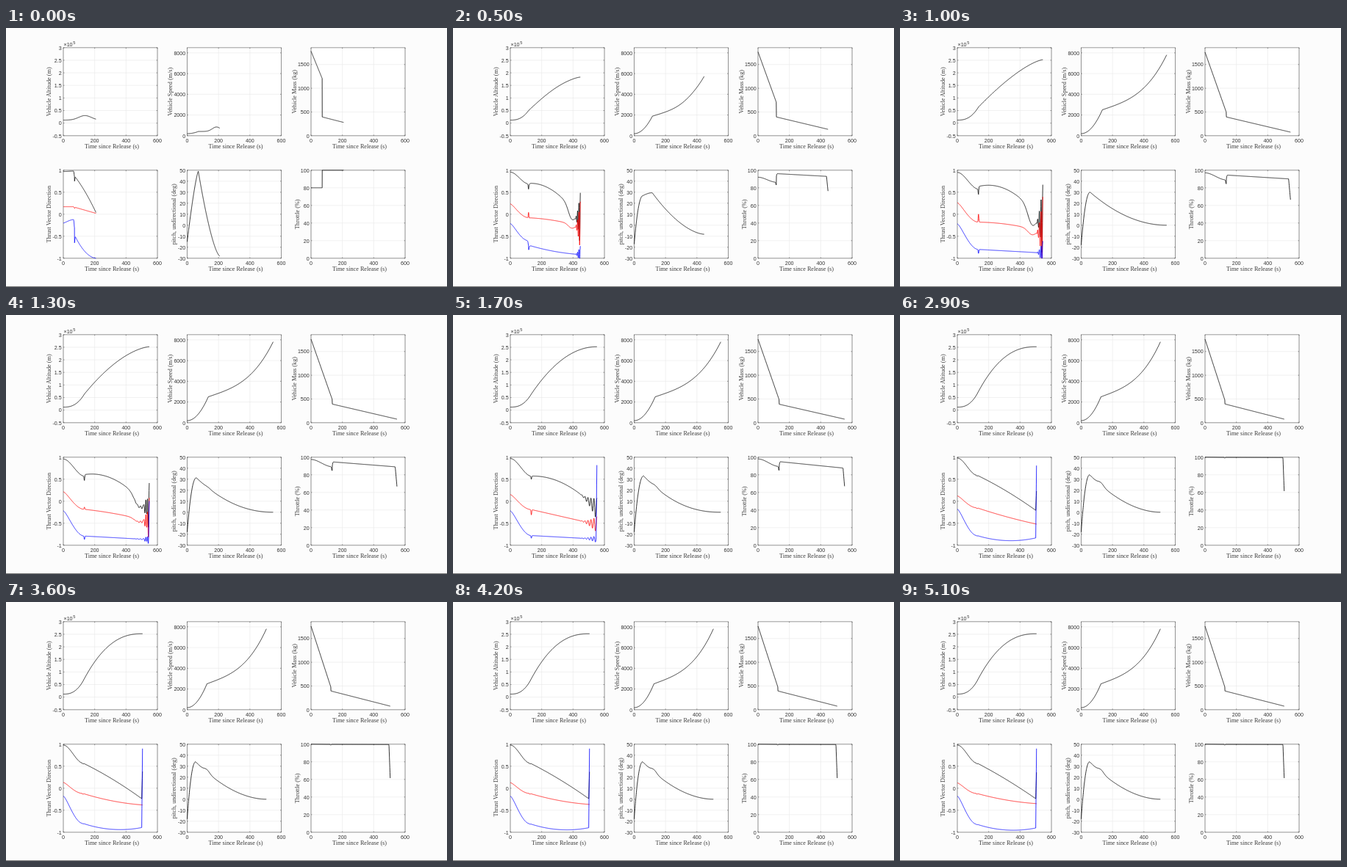
Animation of 600 by 353 pixels, one loop 5400 ms. Source, as an HTML page:

```html
<!DOCTYPE html>
<html lang="en">
<head>
<meta charset="utf-8">
<title>Ascent optimisation</title>
<style>
  html, body { margin: 0; width: 100%; height: 100%; overflow: hidden; background: #fcfcfc; }
  svg { display: block; width: 600px; height: 353px; }
  .tick { font: 7.1px "Liberation Sans", Arial, sans-serif; fill: #333; }
  .label { font: 8.2px "Liberation Serif", "Times New Roman", serif; fill: #3c3c3c; text-anchor: middle; }
  .grid { stroke: #e8e8e8; stroke-width: .6; fill: none; }
  .axes { stroke: #555; stroke-width: .6; fill: none; }
  .curve { stroke-width: .8; fill: none; stroke-linejoin: round; }
</style>
</head>
<body>
<svg id="stage" viewBox="0 0 600 353"></svg>
<script>
const STEP = 100, LOOP = 5400, LAST = 51;
const W = 128, H = 120, T_MAX = 600;
const N = 400, SPLIT = N / 4;          // samples per curve, and those before staging
const stage = document.getElementById('stage');
const lerp = (a, b, p) => a + (b - a) * p;
const clamp = (v, lo = 0, hi = 1) => Math.min(hi, Math.max(lo, v));
const smooth = x => x * x * (3 - 2 * x);
const arch = w => 4 * w * (1 - w);
const hill = (t, mid, width) => Math.exp(-(((t - mid) / width) ** 2));

function el(tag, attrs, parent = stage, text) {
  const e = document.createElementNS('http://www.w3.org/2000/svg', tag);
  for (const k in attrs) e.setAttribute(k, attrs[k]);
  if (text !== undefined) e.textContent = text;
  parent.appendChild(e);
  return e;
}

// Flight model: S is the staging time, T the end of flight
const second = (k, t) => clamp((t - k.S) / (k.T - k.S));

const altitude = k => t => t <= k.S
  ? .12 + .52 * (t / k.S) ** 2.6
  : .64 + 1.88 * (1 - (1 - second(k, t)) ** k.bend);

const speed = k => t => {
  const w = second(k, t);
  return t <= k.S ? 200 + 2300 * (t / k.S) ** 2 : 2500 + 5300 * (.4 * w + .6 * w ** 3.3);
};

const mass = k => t => {
  const [full, burnt, upper, end] = k.mass;
  return t <= k.S ? lerp(full, burnt, t / k.S) : lerp(upper, end, second(k, t));
};

// Eased turn, kick at staging, arched second stage, wobble and jump at cut-off
const thrust = (k, i) => t => {
  const [from, staged, end, bulge = 0, jump = 0, restart = staged] = k.dir[i];
  const w = second(k, t);
  let v = t <= k.S
    ? lerp(from, staged, smooth((t / k.S) ** (i ? .75 : 1)))
    : lerp(restart, end, w) + bulge * arch(w) + jump * clamp((t - k.T) / 5 + 1);
  if (k.kick) v += k.kick[i] * hill(t, k.S, 3);
  if (k.sink) v += k.sink[i] * hill(w, .83, .09);
  if (k.wobble) {
    const { start, period, amp } = k.wobble;
    v += amp[i] * clamp((t - start) / (k.T - start)) ** 2 * Math.cos(2 * Math.PI * (k.T - t) / period);
  }
  return clamp(v, -1, 1);
};

const pitch = k => t => {
  const { from, peak, at, rise, end, fall, knee } = k.pitch;
  return t <= at
    ? lerp(peak, from, (1 - t / at) ** rise)
    : lerp(end, peak, (1 - (t - at) / (k.T - at)) ** fall) + knee * hill(t, k.S, 25);
};

const throttle = k => t => {
  const { from, staged, upper, end, dip, fade, final } = k.throttle;
  const level = t <= k.S ? lerp(from, staged, smooth(t / k.S)) : lerp(upper, end, second(k, t));
  return lerp(level - dip * hill(t, k.S, 4), final, clamp((t - k.T) / fade + 1));
};

// Key iterations; each is sampled so that both flight phases line up
const keys = [];
function key(step, k) {
  const time = Array.from({ length: N + 1 }, (_, i) =>
    i <= SPLIT ? k.S * i / SPLIT : lerp(k.S, k.T, (i - SPLIT) / (N - SPLIT)));
  const rules = [k.alt || altitude(k), k.speed || speed(k), mass(k),
    thrust(k, 0), thrust(k, 1), thrust(k, 2), pitch(k), throttle(k)];
  keys.push({ step, ease: k.ease || 1, time, values: rules.map(f => time.map(f)) });
}

key(0, {
  S: 71, T: 208, ease: .5,
  alt: t => .12 + .18 * hill(t, 138, 57),
  speed: t => 200 + 210 * clamp(t / 72) ** 2 + 430 * hill(t, 187, 38),
  mass: [1780, 1206, 395, 280],
  dir: [[.97, .98, .04, .05, 0, .87], [.17, .17, .02, 0, 0, .16], [-.2, -.12, -1, -.12, 0, -.47]],
  kick: [-.12, -.03, -.18],
  pitch: { from: -15, peak: 49, at: 71, rise: 1.3, end: -28, fall: 1.5, knee: 0 },
  throttle: { from: 80, staged: 80, upper: 100, end: 100, dip: 0, fade: 1, final: 100 }
});

key(10, {
  S: 135, T: 545, bend: 1.4, mass: [1760, 500, 395, 75],
  dir: [[.95, .57, -.2, .3, 0, .63], [.26, -.18, -.4, .05], [-.22, -.8, -.88]],
  kick: [-.12, .18, -.09],
  sink: [-.35, -.13, 0],
  wobble: { start: 500, period: 11, amp: [.88, .8, .27] },
  pitch: { from: -18, peak: 30, at: 57, rise: 2.1, end: 0, fall: 2, knee: 0 },
  throttle: { from: 97, staged: 89, upper: 94.5, end: 90, dip: 4.5, fade: 12, final: 66.5 }
});

key(17, {
  S: 134, T: 552, bend: 2.05, mass: [1760, 490, 390, 75],
  dir: [[.97, .57, -.18, .2], [.15, -.19, -.53], [-.22, -.78, -.86, 0, 1.6]],
  kick: [-.07, -.12, -.06],
  wobble: { start: 430, period: 19, amp: [.25, .18, .08] },
  pitch: { from: -18, peak: 33, at: 60, rise: 2.1, end: 0, fall: 2.25, knee: 1.5 },
  throttle: { from: 98, staged: 89.5, upper: 95, end: 87.5, dip: 4.5, fade: 10, final: 67 }
});

key(21, {
  S: 128, T: 523, bend: 2.3, mass: [1760, 480, 395, 75], ease: .7,
  dir: [[.97, .63, -.18, .06], [.19, -.2, -.5, -.08], [-.2, -.76, -.84, -.06, 1.64]],
  kick: [-.07, -.06, -.05],
  wobble: { start: 410, period: 19, amp: [.08, .04, .02] },
  pitch: { from: -18, peak: 33, at: 58, rise: 2.1, end: 0, fall: 2, knee: 2.5 },
  throttle: { from: 98, staged: 93.5, upper: 97, end: 95.8, dip: 4.5, fade: 10, final: 68 }
});

const settled = {
  S: 126, T: 505, bend: 2.4, mass: [1760, 480, 395, 75], kick: [-.02, -.02, -.01],
  pitch: { from: -18, peak: 34, at: 54, rise: 2.1, end: 0, fall: 1.9, knee: 2.5 },
  throttle: { from: 100, staged: 99.8, upper: 99.8, end: 99.6, dip: .8, fade: 8, final: 61.5 }
};
key(29, { ...settled, dir: [[.98, .59, -.22, .04, .45], [.12, -.15, -.52, -.02], [-.18, -.78, -.83, -.09, 1.64]] });
key(36, { ...settled, dir: [[.98, .57, -.25, .04, .63], [.13, -.12, -.38, -.04], [-.18, -.8, -.89, -.09, 1.79]] });
key(LAST, { ...settled, dir: [[.98, .57, -.25, .03, .61], [.12, -.12, -.35, -.035], [-.18, -.82, -.9, -.09, 1.8]] });

// Plots
const curves = [];
function plot(x, y, lo, hi, last, gap, name, nameX, colors = ['#000']) {
  const px = t => x + t / T_MAX * W, py = v => y + H - (v - lo) / (hi - lo) * H;
  el('rect', { x, y, width: W, height: H, fill: '#fff' });
  let grid = '', marks = `M${x} ${y}h${W}v${H}h${-W}z`;
  for (let t = 0; t <= T_MAX; t += 200) {
    grid += `M${px(t)} ${y}v${H}`;
    marks += `M${px(t)} ${y}v1.4M${px(t)} ${y + H}v-1.4`;
    el('text', { class: 'tick', x: px(t), y: y + H + 8.8, 'text-anchor': 'middle' }, stage, t);
  }
  for (let v = lo; v <= last; v += gap) {
    grid += `M${x} ${py(v)}h${W}`;
    marks += `M${x} ${py(v)}h1.4M${x + W} ${py(v)}h-1.4`;
    el('text', { class: 'tick', x: x - 2.3, y: py(v) + 2.7, 'text-anchor': 'end' }, stage, v);
  }
  el('path', { class: 'grid', d: grid });
  el('path', { class: 'axes', d: marks });
  el('text', { class: 'label', x: x + W / 2 + 2, y: y + H + 17.5 }, stage, 'Time since Release (s)');
  el('text', { class: 'label', transform: `translate(${nameX} ${y + H / 2}) rotate(-90)` }, stage, name);
  for (const stroke of colors) curves.push({ path: el('path', { class: 'curve', stroke }), px, py });
}

const COLS = [78, 246.5, 415], TOP = 26.8, LOW = 193.8;
plot(COLS[0], TOP, -.5, 3, 3, .5, 'Vehicle Altitude (m)', 61);
plot(COLS[1], TOP, 0, 8500, 8000, 2000, 'Vehicle Speed (m/s)', 225.5);
plot(COLS[2], TOP, 0, 1855, 1500, 500, 'Vehicle Mass (kg)', 394.5);
plot(COLS[0], LOW, -1, 1, 1, .5, 'Thrust Vector Direction', 61, ['#000', '#f00', '#00f']);
plot(COLS[1], LOW, -30, 50, 50, 10, 'pitch, undirectional (deg)', 231);
plot(COLS[2], LOW, 0, 100, 100, 20, 'Throttle (%)', 398.5);
el('text', { class: 'tick', x: 78.5, y: 25 }, stage, '×10');
el('text', { class: 'tick', x: 91.3, y: 22, style: 'font-size:5.6px' }, stage, '5');
el('rect', { x: 0, y: 352, width: 600, height: 1, fill: '#777' });

function draw(step) {
  let i = 0;
  while (i < keys.length - 2 && step >= keys[i + 1].step) i++;
  const a = keys[i], b = keys[i + 1];
  const p = ((step - a.step) / (b.step - a.step)) ** a.ease;
  curves.forEach(({ path, px, py }, c) => {
    const points = a.time.map((t, j) =>
      px(lerp(t, b.time[j], p)).toFixed(2) + ' ' + py(lerp(a.values[c][j], b.values[c][j], p)).toFixed(2));
    path.setAttribute('d', 'M' + points.join('L'));
  });
}

let shown = -1;
const start = performance.now();
function tick() {
  const step = Math.min(LAST, Math.floor((performance.now() - start) % LOOP / STEP));
  if (step !== shown) draw(shown = step);
  requestAnimationFrame(tick);
}
tick();
</script>
</body>
</html>
```
